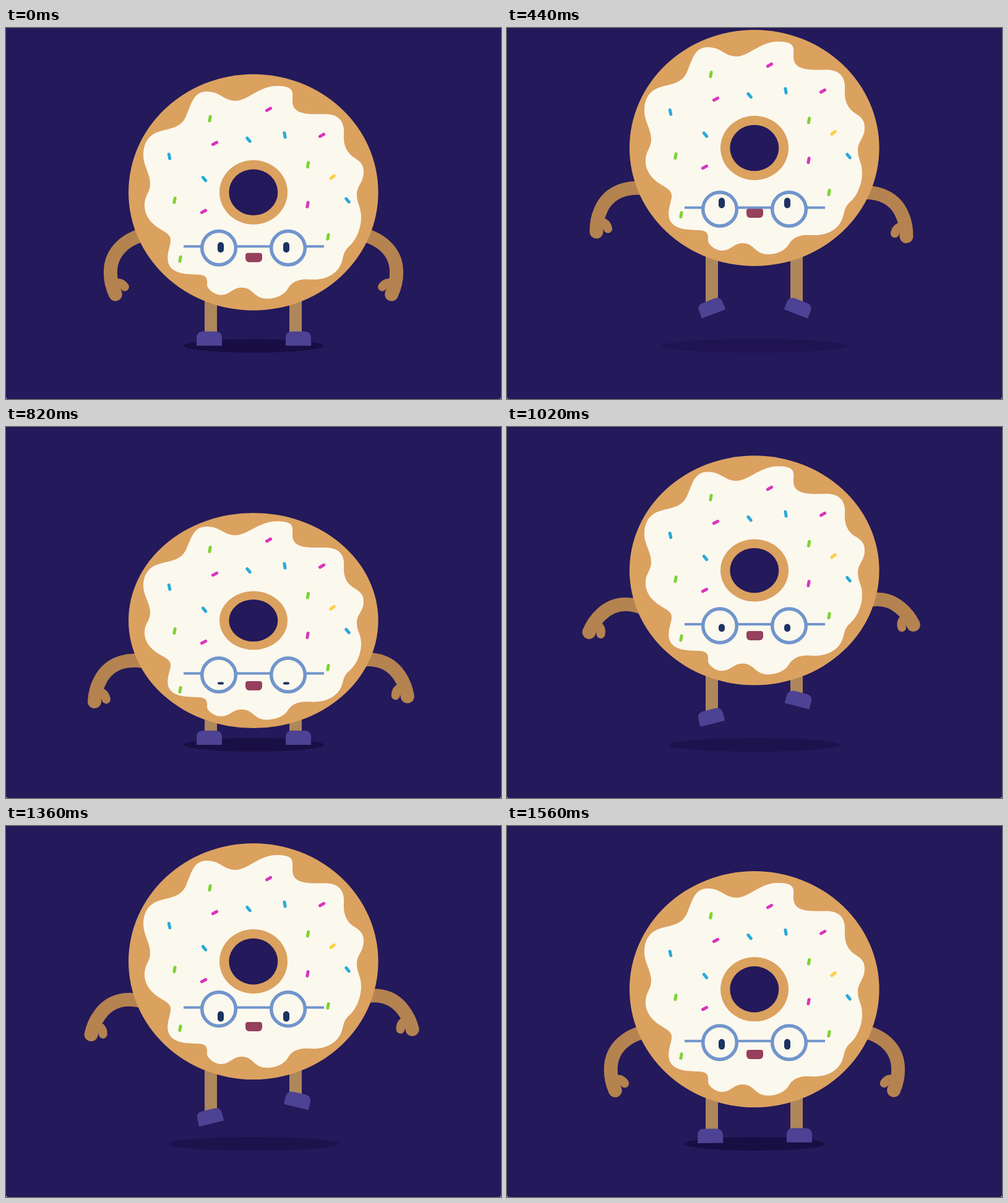
An HTML page with a canvas for the animation above (1580 ms loop, 800x600 px).

```html
<!DOCTYPE html>
<html lang="en">
<head>
<meta charset="utf-8">
<title>Jumping donut</title>
<style>
  html, body { margin: 0; width: 100%; height: 100%; overflow: hidden; background: #fff; }
  canvas { display: block; width: 800px; height: 600px; border-radius: 0 0 3px 3px; }
</style>
</head>
<body>
<canvas id="stage" width="800" height="600"></canvas>
<script>
const ctx = document.getElementById('stage').getContext('2d');
const LOOP = 1580;
const NAVY = '#23195b', DOUGH = '#dba15f', ICING = '#fbf8ee', ARM = '#b58350', LEG = '#ae875a',
      SHOE = '#4d4293', FRAME = '#7195cc', PUPIL = '#1c3262', LIPS = '#96405d', SHADOW = '#190f45';
const GREEN = '#7fd334', PINK = '#d935bf', BLUE = '#2aa9da', YELLOW = '#ffce47';

// Key poses: standing, first apex, landing, second apex. Arms: [degrees, inset, drop]
const POSES = [
  { y: 0, squash: 0, lift: 0, rightLift: 0, left: [0, 0, 0], right: [0, 0, 0] },
  { y: -72.5, squash: 0, lift: 51, rightLift: 51, left: [24, 0, 0], right: [24, 10, 7.5] },
  { y: 47, squash: 1, lift: 0, rightLift: 0, left: [28, 2.5, 1.6], right: [34, 16, 3] },
  { y: -72.5, squash: 0, lift: 50, rightLift: 91.5, left: [57, 7, 5], right: [60, 18, -3] }
];
const POSE_TIMES = [0, 430, 820, 1220, LOOP];

// Height of the jump (0 low, 1 apex) and distance of the glasses below the centre
const jump = track([[0, 0], [180, .73], [430, 1], [540, .76], [820, 0], [1020, .676],
  [1080, .806], [1220, 1], [1360, .65], [1560, .028], [LOOP, 0]]);
const glassesDrop = track([[0, 90], [180, 98.5], [440, 99], [610, 80], [820, 88], [1020, 89.5],
  [1130, 96], [1240, 93], [1360, 77], [1560, 86], [LOOP, 90]]);

const icing = new Path2D(`M325 103C346 103 352 118 371 118S410 94 437 94S464 102 463 116
  C462 132 472 139 495 139.5C515 140 520 138 531 142C543 147 547 158 546 172
  C545 192 552 203 563 210C575 217 578 224 578 233C578 250 567 255 567 270
  C567 284 574 290 574 306C574 326 565 344 555 353C541 365 548 376 536 391
  C525 404 508 408 492 407C470 405 461 413 456 421C450 432 436 438 422 438
  C400 438 400 420 381 420C366 420 362 432 347 432C337 432 325 422 325 416
  C326 404 323 399 308 399C290 398 280 398 270 391C262 385 260 376 262 364
  C264 353 268 345 265 338C261 330 247 326 238 317C228 308 223 296 224 284
  C225 270 233 266 233 252C233 235 221 222 222 203C223 185 231 172 250 167
  C268 162 283 161 291 143C300 122 303 103 325 103Z`);
const arm = new Path2D('M5-8C-35-2-62 22-61 57Q-61 74-53 91');
const thumb = new Path2D('M-58 76Q-46 68-38 79');
const shoe = new Path2D('M-20.5 11.5V-.5Q-20.5-11.5-9.5-11.5H9.5Q20.5-11.5 20.5-.5V11.5Z');
const glasses = new Path2D('M287-2.5H315M373-2.5H427M485-2.5H514');

// x, y, degrees, colour
const SPRINKLES = [
  [329.5, 147, 100, GREEN], [488, 221.5, 100, GREEN], [272.5, 279, 100, GREEN],
  [520.5, 338, 100, GREEN], [281.5, 374, 100, GREEN],
  [424.5, 132, -30, PINK], [337.5, 187, -28, PINK], [510.5, 174, -30, PINK],
  [487.5, 286, 100, PINK], [319.5, 297, -28, PINK],
  [392, 181, 50, BLUE], [450.5, 173.5, 80, BLUE], [264, 208, 78, BLUE],
  [320.5, 244.5, 50, BLUE], [552, 279, 50, BLUE], [527.5, 241.5, -38, YELLOW]
];

// Smooth curve through [time, value] points that never overshoots them
function track(points) {
  const slopes = points.slice(1).map(([t, v], i) => (v - points[i][1]) / (t - points[i][0]));
  const tangents = points.map((_, i) => {
    const a = slopes[i - 1] ?? slopes[i], b = slopes[i] ?? a;
    return a * b <= 0 ? 0 : 2 * a * b / (a + b);
  });
  return time => {
    let i = 0;
    while (i < points.length - 2 && time >= points[i + 1][0]) i++;
    const [t0, v0] = points[i], [t1, v1] = points[i + 1];
    const d = t1 - t0, x = (time - t0) / d, r = 1 - x;
    return v0 * r * r * (1 + 2 * x) + v1 * x * x * (3 - 2 * x)
      + d * x * r * (tangents[i] * r - tangents[i + 1] * x);
  };
}

function mix(a, b, p) {
  if (typeof a === 'number') return a + (b - a) * p;
  if (Array.isArray(a)) return a.map((v, i) => mix(v, b[i], p));
  return Object.fromEntries(Object.keys(a).map(key => [key, mix(a[key], b[key], p)]));
}

function poseAt(time) {
  let i = 0;
  while (i < 3 && time >= POSE_TIMES[i + 1]) i++;
  const height = jump(time);
  return mix(POSES[i], POSES[(i + 1) % 4], i % 2 ? 1 - height : height);
}

function at(x, y, degrees, draw) {
  ctx.save();
  ctx.translate(x, y);
  ctx.rotate(degrees * Math.PI / 180);
  draw();
  ctx.restore();
}

function ellipse(x, y, rx, ry, color) {
  ctx.fillStyle = color;
  ctx.beginPath();
  ctx.ellipse(x, y, rx, ry, 0, 0, 7);
  ctx.fill();
}

function roundRect(x, y, w, h, radii, color) {
  ctx.fillStyle = color;
  ctx.beginPath();
  ctx.roundRect(x, y, w, h, radii);
  ctx.fill();
}

function stroke(path, width, color) {
  ctx.lineWidth = width;
  ctx.strokeStyle = color;
  ctx.stroke(path);
}

function drawArm(side, [degrees, inset, drop], y) {
  ctx.save();
  ctx.translate(400, y + 74 + drop);
  ctx.scale(side, 1);
  at(inset - 170, 0, degrees, () => {
    stroke(arm, 22, ARM);
    stroke(thumb, 14, ARM);
  });
  ctx.restore();
}

function drawLeg(side, lift, tilt, y) {
  const footY = 502.5 - lift;
  ctx.fillStyle = LEG;
  ctx.fillRect(399.5 + side * 68.5 - 10, y + 110, 20, footY - y - 110);
  at(400.5 + side * (72 - tilt * .07), footY, side * tilt, () => {
    ctx.fillStyle = SHOE;
    ctx.fill(shoe);
  });
}

function drawFace(y, squash, drop) {
  roundRect(387, y + 98, 27, 15, [4, 4, 6, 6], LIPS);
  const eye = 17 - 13 * squash;
  for (const x of [342, 448])
    roundRect(x, y + 89 + 12.5 * squash - eye / 2, 10, eye, Math.min(5, eye / 2), PUPIL);
  at(0, y + drop, 0, () => {
    ctx.lineCap = 'butt';
    stroke(glasses, 4, FRAME);
    for (const x of [344, 456]) {
      const lens = new Path2D();
      lens.arc(x, 0, 27.3, 0, 7);
      stroke(lens, 5.5, FRAME);
    }
  });
}

function draw(time) {
  const pose = poseAt(time), { squash, lift } = pose, y = 266 + pose.y;
  ctx.fillStyle = NAVY;
  ctx.fillRect(0, 0, 800, 600);
  ctx.lineCap = 'round';

  ctx.globalAlpha = 1 - lift * .011;
  ellipse(400.5, 514, 113 + .74 * lift, 11, SHADOW);
  ctx.globalAlpha = 1;

  drawArm(1, pose.left, y);
  drawArm(-1, pose.right, y);
  drawLeg(-1, lift, lift * .415, y);
  drawLeg(1, pose.rightLift, lift * .415, y);

  const scale = 1 - .089 * squash;
  ellipse(399.8, y, 201.8, 191 * scale, DOUGH);
  at(0, y, 0, () => {
    ctx.scale(1, 1 - .067 * squash);
    ctx.translate(0, -266);
    ctx.fillStyle = ICING;
    ctx.fill(icing);
  });
  ellipse(400, y, 55, 52 * scale, DOUGH);
  ellipse(399.8, y, 39.5, 37.3 * scale, NAVY);

  const bit = new Path2D('M-3.5 0H3.5');
  for (const [x, sy, degrees, color] of SPRINKLES)
    at(x, sy + pose.y + 4 * squash, degrees, () => stroke(bit, 5, color));

  drawFace(y, squash, glassesDrop(time));
}

function frame() {
  draw(performance.now() % LOOP);
  requestAnimationFrame(frame);
}
frame();
</script>
</body>
</html>
```
